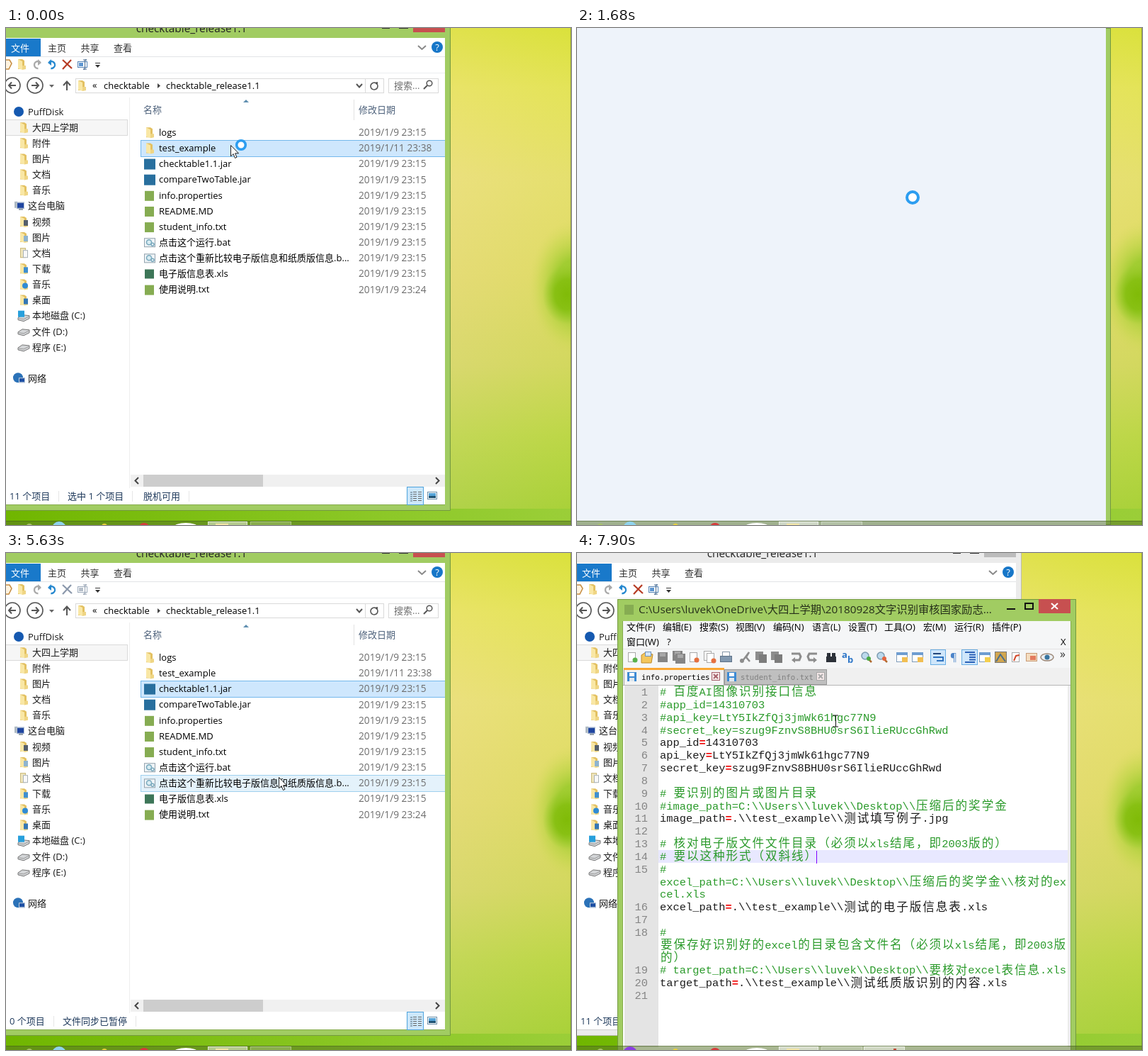
Animation of 798x701 px, one loop 8000 ms. Source, as an HTML page with a canvas:

```html
<!DOCTYPE html>
<html lang="zh-CN">
<head>
<meta charset="utf-8">
<title>Explorer session</title>
<style>
html, body { margin: 0; width: 100%; height: 100%; overflow: hidden; }
canvas { display: block; width: 798px; height: 701px; }
</style>
</head>
<body>
<canvas id="stage" width="798" height="701"></canvas>
<script>
const c = document.getElementById('stage').getContext('2d');
const LOOP = 8000;
const UI = '"Open Sans","Noto Sans CJK SC","Noto Sans CJK",sans-serif';
const MONO = '"Liberation Mono","Noto Sans CJK SC","Noto Sans CJK",monospace';
const ROW = 22.13;

// Value of the last key whose time has passed.
const at = (t, keys) => keys.reduce((v, k) => t >= k[0] ? k[1] : v, keys[0][1]);
const within = (t, a, b) => t >= a && t < b;

function box(x, y, w, h, fill, line) {
  if (fill) { c.fillStyle = fill; c.fillRect(x, y, w, h); }
  if (line) { c.strokeStyle = line; c.lineWidth = 1; c.strokeRect(x + .5, y + .5, w - 1, h - 1); }
}
function text(s, x, y, size = 13, color = '#000', align = 'left', family = UI, weight = 400) {
  c.font = `${weight} ${size}px ${family}`;
  c.fillStyle = color;
  c.textAlign = align;
  c.fillText(s, x, y + size * .36);
}
function path(pts, line, width = 1, fill, close) {
  c.beginPath();
  for (let i = 0; i < pts.length; i += 2) c.lineTo(pts[i], pts[i + 1]);
  if (close) c.closePath();
  if (fill) { c.fillStyle = fill; c.fill(); }
  if (line) { c.strokeStyle = line; c.lineWidth = width; c.stroke(); }
}
function disc(x, y, r, fill, line, width = 1, from = 0, to = 7) {
  c.beginPath();
  c.arc(x, y, r, from, to);
  if (fill) { c.fillStyle = fill; c.fill(); }
  if (line) { c.strokeStyle = line; c.lineWidth = width; c.stroke(); }
}
function oval(x, y, rx, ry, fill, line) {
  c.beginPath();
  c.ellipse(x, y, rx, ry, 0, 0, 7);
  c.fillStyle = fill;
  c.fill();
  if (line) { c.strokeStyle = line; c.lineWidth = 1.5; c.stroke(); }
}
function gradient(x0, y0, x1, y1, stops) {
  const g = c.createLinearGradient(x0, y0, x1, y1);
  stops.forEach(([p, col]) => g.addColorStop(p, col));
  return g;
}

const icons = {
  folder(x, y) {
    path([x - 5, y - 7, x + 1, y - 7, x + 4, y - 5, x + 4, y + 7, x - 5, y + 7], null, 0, '#e3c162', true);
    path([x - 5, y - 7, x + 1, y - 4, x + 1, y + 8, x - 5, y + 6], null, 0, '#f9e7a5', true);
    path([x + 1, y + 2, x + 6, y + 2, x + 6, y + 7, x + 1, y + 8], null, 0, '#efd584', true);
  },
  media(x, y, col) { icons.folder(x, y); box(x, y - 2, 6, 8, col); },
  video(x, y) { icons.media(x, y, '#555f6b'); },
  image(x, y) { icons.media(x, y, '#8fb4cf'); },
  paper(x, y) { box(x - 5, y - 7, 8, 14, '#efe5bd', '#c9b97a'); box(x - 1, y - 4, 7, 11, '#f8f8f8', '#a9b2b8'); },
  down(x, y) { icons.media(x, y, '#3f8fd0'); },
  music(x, y) { icons.folder(x, y); disc(x + 2, y + 2, 4, '#2f8bd4'); },
  desktop(x, y) { icons.media(x, y, '#3578b4'); },
  cloud(x, y) { disc(x, y, 7, '#1559b0'); },
  pc(x, y) { box(x - 6, y - 6, 4, 9, '#aeb9c2'); box(x - 3, y - 5, 11, 9, '#1f45a0', '#b9c6d4'); box(x, y + 4, 6, 2, '#8e9aa5'); },
  system(x, y) { icons.disk(x, y + 2); box(x - 8, y - 7, 9, 9, '#28a0dc'); },
  disk(x, y) {
    path([x - 8, y + 1, x - 2, y - 3, x + 8, y - 2, x + 8, y + 2, x, y + 6, x - 8, y + 4], '#777', 1, '#d4d6d8', true);
    path([x - 7, y + 2, x, y + 3, x + 8, y - 1], '#999');
  },
  net(x, y) { disc(x - 1, y - 1, 7, '#2b72b8'); box(x, y - 1, 9, 7, '#1d4fa4', '#c4d2dc'); },
  jar(x, y) { box(x - 8, y - 7, 16, 15, '#286f9e'); },
  note(x, y) { box(x - 7, y - 6, 13, 14, '#86ac52'); },
  xls(x, y) { box(x - 7, y - 6, 13, 13, '#3d7658'); },
  bat(x, y) {
    box(x - 8, y - 6, 16, 13, '#eef3f6', '#93a3ae');
    disc(x - 1, y, 3.5, '#d8ecf3', '#78a9bd', 1.5);
    disc(x + 4, y + 3, 2, null, '#78a9bd', 1.5);
  },
  photo(x, y) {
    box(x - 8, y - 5, 15, 12, '#fff', '#b8c4cc');
    box(x - 7, y - 4, 13, 10, gradient(0, y - 4, 0, y + 6, [[0, '#8cc7ee'], [.5, '#cfe7f4'], [.6, '#2c6280'], [1, '#3d86a8']]));
  }
};

const nav = [
  ['cloud', 'PuffDisk', 0], ['folder', '大四上学期'], ['folder', '附件'], ['folder', '图片'],
  ['folder', '文档'], ['folder', '音乐'], ['pc', '这台电脑', 0], ['video', '视频'], ['image', '图片'],
  ['paper', '文档'], ['down', '下载'], ['music', '音乐'], ['desktop', '桌面'],
  ['system', '本地磁盘 (C:)'], ['disk', '文件 (D:)'], ['disk', '程序 (E:)'], null, ['net', '网络', 0]
];
const DAY = '2019/1/9 23:15';
const release = [
  ['folder', 'logs'], ['folder', 'test_example', '2019/1/11 23:38'], ['jar', 'checktable1.1.jar'],
  ['jar', 'compareTwoTable.jar'], ['note', 'info.properties'], ['note', 'README.MD'],
  ['note', 'student_info.txt'], ['bat', '点击这个运行.bat'],
  ['bat', '点击这个重新比较电子版信息和纸质版信息.b...'], ['xls', '电子版信息表.xls'],
  ['note', '使用说明.txt', '2019/1/9 23:24']
];
const example = [
  ['xls', '表1.xls'], ['xls', '表1为基准的比较结果.xls'], ['xls', '表2.xls'],
  ['xls', '测试的电子版信息表.xls'], ['photo', '测试填写例子.jpg']
];

function glow(x, y, rx, ry, stops) {
  c.save();
  c.translate(x, y);
  c.scale(rx, ry);
  const g = c.createRadialGradient(0, 0, 0, 0, 0, 1);
  stops.forEach(([p, col]) => g.addColorStop(p, col));
  c.fillStyle = g;
  c.fillRect(-1, -1, 2, 2);
  c.restore();
}
function desktop() {
  box(0, 0, 798, 701, gradient(0, 0, 0, 701, [
    [0, '#dce23c'], [.12, '#e8e560'], [.3, '#eae07c'], [.5, '#e2da72'],
    [.68, '#d2d668'], [.82, '#b6d54a'], [1, '#98cc34']]));
  box(627, 0, 171, 701, gradient(627, 0, 798, 0, [[0, 'rgba(236,222,128,.25)'], [1, 'rgba(212,222,60,.22)']]));
  glow(800, 366, 62, 95, [[0, '#98c928'], [.4, 'rgba(155,203,44,.9)'], [.75, 'rgba(190,214,70,.45)'], [1, 'rgba(215,218,95,0)']]);
  glow(792, 376, 34, 42, [[0, '#80bb08'], [.5, 'rgba(132,190,14,.85)'], [1, 'rgba(150,200,40,0)']]);
  box(0, 678, 798, 23, gradient(0, 0, 798, 0, [[0, '#70b600'], [.75, '#90ca2c'], [1, '#9bce38']]));
}

function arrowButton(x, dir, on) {
  const col = on ? '#555' : '#c4c4c4';
  disc(x, 81, 11, '#fff', col, 1.6);
  path([x - 5 * dir, 81, x + 5 * dir, 81], col, 2);
  path([x + dir, 76.5, x + 5 * dir, 81, x + dir, 85.5], col, 2);
}

function ribbon(t, live) {
  const tools = within(t, 850, 3430);
  const inRelease = t < 100 || t >= 4300;
  box(0, 0, 628, 680, live ? '#a1cc62' : '#ebebeb');
  path([627.5, 0, 627.5, 680.5, 0, 680.5], live ? '#73993f' : '#bcbcb0');
  box(0, 14, 620, 659, '#fff', live ? '#86ac4d' : '#d0d0d0');
  box(-2, 14, 622, 658, '#fff');
  text(inRelease ? 'checktable_release1.1' : 'test_example', tools ? 99 : 262, .5, 15.36, '#222', 'center');
  box(575, 0, 45, 6, live ? '#c75050' : '#bcbcbc');
  box(531, 0, 11, 1, '#333');
  box(555, 0, 13, 1, '#333');
  box(0, 15, 49, 25, '#1979ca');
  text('文件', 7, 28, 13, '#fff');
  ['主页', '共享', '查看'].forEach((s, i) => text(s, 59 + 46.5 * i, 28.5, 13, '#333'));
  if (tools) {
    box(190, 0, 62, 15, '#f3f183');
    text('图片工具', 194, 2, 13, '#665f20');
    path([190.5, 15, 190.5, 39], '#e4e4e4');
    path([251.5, 15, 251.5, 39], '#e4e4e4');
    text('管理', 207, 28.5, 13, '#333');
  }
  path([582, 25, 587.5, 30, 593, 25], '#888', 2);
  disc(609, 27, 8, '#1676c8');
  text('?', 609, 27, 13, '#fff', 'center');
  path([0, 40.5, 620, 40.5], '#e2e4e6');
  path([0, 63.5, 620, 63.5], '#eceef0');
}

function quickBar(on) {
  path([0, 45, 5, 45, 8, 50, 4, 58, 0, 58], '#c58b3f', 1.5, '#fff3df');
  icons.folder(22, 51);
  const turn = (x, dir, col) => {
    disc(x - dir, 52, 5, null, col, 2.4, dir > 0 ? -2.2 : -4.8, dir > 0 ? 1.7 : -.9);
    path([x - 6 * dir, 49, x - dir, 44, x - dir, 53], null, 0, col, true);
  };
  turn(44, -1, '#aaa');
  turn(65, 1, '#2688cf');
  const cross = on ? '#b63b24' : '#8b98ab';
  path([80, 45, 93, 57], cross, 2.2);
  path([92, 45, 80, 58], cross, 2.2);
  box(101, 47, 14, 9, '#fff', on ? '#5281b4' : '#9caabb');
  box(103, 49, 6, 5, on ? '#5c95d1' : '#b5bec9');
  path([109, 45, 114, 45, 111.5, 45, 111.5, 58, 109, 58, 114, 58], on ? '#41658c' : '#8f9cad');
  box(126, 49, 7, 1, '#333');
  path([126, 52, 133, 52, 129.5, 56], null, 0, '#333', true);
}

function addressBar(t) {
  const inRelease = t < 100 || t >= 4300;
  arrowButton(9, -1, true);
  arrowButton(41, 1, !within(t, 100, 4190));
  path([61, 80, 68, 80, 64.5, 84], null, 0, '#666', true);
  path([86, 88, 86, 76], '#555', 2);
  path([81, 81, 86, 75.5, 91, 81], '#555', 2);
  box(98, 71, 436, 21, '#fff', '#d9d9d9');
  path([507.5, 71, 507.5, 92], '#d9d9d9');
  icons.folder(107, 81);
  text('«', 122, 80);
  text(inRelease ? 'checktable' : 'checktable_release1.1', 138, 81);
  const x = inRelease ? 214 : 281;
  path([x, 78, x + 4, 81.5, x, 85], null, 0, '#444', true);
  text(inRelease ? 'checktable_release1.1' : 'test_example', inRelease ? 226 : 293, 81);
  path([495, 79, 499, 83.5, 503, 79], '#555', 2);
  disc(520, 82, 5, null, '#555', 1.6, -.4, 5);
  path([520, 77, 525, 76, 525, 81], null, 0, '#555', true);
  box(540, 71, 71, 21, '#fff', '#d9d9d9');
  text('搜索...', 548, 81.5, 13, '#6d6d6d');
  disc(598, 78, 3.8, null, '#555', 1.5);
  path([595, 81, 590, 86], '#555', 2);
}

function navPane() {
  box(-1, 129, 173, 23, '#f6f6f6', '#dadada');
  nav.forEach((item, i) => {
    if (!item) return;
    const [icon, label, level = 1] = item, y = 118 + ROW * i;
    icons[icon](level ? 25 : 18, y);
    text(label, level ? 37 : 31, y, 13, '#1a1a1a');
  });
  path([174.5, 98, 174.5, 649], '#eeeeee');
}

function fileList(t) {
  text('名称', 194, 115, 13, '#4c607a');
  text('修改日期', 498, 115, 13, '#4c607a');
  path([335, 105, 339, 101, 343, 105], null, 0, '#5f8fb0', true);
  path([491.5, 101, 491.5, 130], '#e2e2e2');
  if (within(t, 100, 190) || within(t, 4300, 4750)) return;
  const files = t < 100 || t >= 4300 ? release : example;
  const chosen = at(t, [[0, 1], [100, -1], [750, 4], [4300, 1], [5630, 2], [5730, 4]]);
  const outline = within(t, 3280, 4300);
  const hover = within(t, 4750, 5730) ? 8 : -1;
  c.save();
  c.beginPath();
  c.rect(176, 130, 444, 500);
  c.clip();
  files.forEach(([icon, name, date = DAY], i) => {
    const y = 147.3 + ROW * i, top = Math.round(y - 11.5);
    if (i === chosen) box(190, top, 434, 24, outline ? null : '#cee7fd', '#74b8ec');
    else if (i === hover) box(190, top, 434, 24, '#e4f2fb', '#9fd0ee');
    icons[icon](203, y);
    text(name, 216, y);
    text(date, 498, y, 13.7, '#6d6d6d');
  });
  c.restore();
}

function statusBar(t) {
  const parts = at(t, [
    [0, [5, '11 个项目', 87, '选中 1 个项目', 194, '脱机可用']],
    [100, [5, '5 个项目', 80, '文件同步已暂停']],
    [850, [5, '5 个项目', 80, '选中 1 个项目', 170, '456 KB', 233, '脱机可用']],
    [3530, [5, '5 个项目', 80, '文件同步已暂停']],
    [4300, [5, '0 个项目', 80, '文件同步已暂停']],
    [5730, [5, '11 个项目', 87, '选中 1 个项目', 194, '脱机可用']]]);
  for (let i = 0; i < parts.length; i += 2) {
    text(parts[i + 1], parts[i], 660.5, 13, '#1e395b');
    const end = parts[i] + c.measureText(parts[i + 1]).width + 12;
    if (parts[i + 1] !== '选中 1 个项目' || parts.length < 8) path([Math.round(end) + .5, 653, Math.round(end) + .5, 668], '#e6e6e6');
  }
  box(176, 630, 444, 17, '#f0f0f0');
  box(194, 630, 169, 17, '#cdcdcd');
  path([187, 634, 182.5, 638.5, 187, 643], '#444', 2);
  path([607, 634, 611.5, 638.5, 607, 643], '#444', 2);
  box(566, 647, 24, 26, '#cde8fb', '#4fa3dc');
  for (let y = 654; y < 668; y += 3) {
    box(571, y, 3, 2, '#8fa9ba');
    box(575, y, 5, 1, '#666');
    box(582, y, 5, 1, '#666');
  }
  box(595, 654, 14, 11, '#fff', '#6d8fa8');
  box(597, 656, 10, 5, '#56a4d8');
  box(597, 660, 10, 3, '#1e5273');
}

function explorer(t) {
  ribbon(t, !(within(t, 1200, 2620) || t >= 6260));
  quickBar(t < 100 || within(t, 850, 3430) || t >= 5730);
  addressBar(t);
  navPane();
  fileList(t);
  statusBar(t);
}

function viewer() {
  box(0, 0, 754, 701, '#a1cc62', '#73993f');
  box(0, 0, 747, 701, '#eef3fa');
}

const menu = ['文件(F)', 70, '编辑(E)', 121, '搜索(S)', 173, '视图(V)', 224, '编码(N)', 277, '语言(L)', 332,
  '设置(T)', 383, '工具(O)', 434, '宏(M)', 489, '运行(R)', 533, '插件(P)', 586];

const code = String.raw`# 百度AI图像识别接口信息
#app_id=14310703
#api_key=LtY5IkZfQj3jmWk61hgc77N9
#secret_key=szug9FznvS8BHU0srS6IlieRUccGhRwd
app_id=14310703
api_key=LtY5IkZfQj3jmWk61hgc77N9
secret_key=szug9FznvS8BHU0srS6IlieRUccGhRwd

# 要识别的图片或图片目录
#image_path=C:\\Users\\luvek\\Desktop\\压缩后的奖学金
image_path=.\\test_example\\测试填写例子.jpg

# 核对电子版文件文件目录（必须以xls结尾，即2003版的）
# 要以这种形式（双斜线）
#|excel_path=C:\\Users\\luvek\\Desktop\\压缩后的奖学金\\核对的ex|cel.xls
excel_path=.\\test_example\\测试的电子版信息表.xls

#|要保存好识别好的excel的目录包含文件名（必须以xls结尾，即2003版|的）
# target_path=C:\\Users\\luvek\\Desktop\\要核对excel表信息.xls
target_path=.\\test_example\\测试纸质版识别的内容.xls
`.split('\n');

const CELL = 9.26;
function codeRow(line, y, comment) {
  let x = 117;
  for (const ch of line) {
    const wide = ch > '\u2000';
    const color = comment ? '#2a9a2a' : ch === '=' ? '#f00000' : '#1c1c1c';
    if (wide) text(ch, x + .9, y, 16.6, color, 'left', MONO, 300);
    else text(ch, x, y, 15.43, color, 'left', MONO, ch === '=' && !comment ? 700 : 400);
    x += wide ? CELL * 2 : CELL;
  }
}

function editor(t) {
  box(67, 187, 48, 510, '#e4e4e4');
  box(693, 187, 4, 510, '#ececec');
  if (t < 7380) return;
  box(115, 419, 578, 18, '#e8e8ff');
  let y = 195.5;
  code.forEach((line, i) => {
    text(i + 1, 100, y, 15.43, '#858585', 'right', MONO);
    line.split('|').forEach(part => {
      codeRow(part, y, line[0] === '#');
      y += 17.83;
    });
  });
  if (!within(t, 7590, 7900)) box(338, 420, 1, 18, '#8000ff');
}

function floppy(x, y, col) {
  box(x - 6, y - 6, 13, 13, col);
  box(x - 3, y - 5, 7, 5, '#fff');
  box(x - 3, y + 2, 7, 5, '#dfe7ee');
}
function graySave(x, y) {
  box(x - 7, y - 7, 14, 14, '#858585');
  box(x - 4, y - 6, 8, 5, '#a8a8a8');
}
function page(x, y, badge) {
  box(x - 6, y - 7, 11, 14, '#fff', '#a9a9a9');
  if (badge) disc(x + 4, y + 4, 3.5, badge);
}
function lens(x, y, col) {
  path([x + 2, y + 2, x + 7, y + 7], '#b06a30', 2.5);
  disc(x - 2, y - 2, 5, '#bcd9ec', '#7c9bb0', 1.5);
  disc(x + 3, y + 2, 3, col);
}
function panel(x, y, col) {
  box(x - 8, y - 7, 16, 14, '#fff', '#7f9cba');
  box(x - 8, y - 7, 16, 4, '#6f9dd0');
  box(x, y, 8, 7, col);
}

function toolbar() {
  const y = 147, gray = '#8d8d8d';
  box(65, 136, 632, 26, '#f5f6f7');
  page(78, y, '#59b14b');
  path([91, 144, 97, 140, 107, 143, 105, 155, 91, 155], '#bd8a2b', 1, '#f4c65c', true);
  box(96, 139, 9, 7, '#d4e5f6', '#6e93bd');
  graySave(121, y);
  graySave(142, y - 2);
  graySave(146, y + 2);
  page(165, y, '#e57040');
  page(185, y - 2);
  page(189, y + 1, '#e57040');
  box(205, 139, 11, 7, '#fff', '#8899aa');
  box(202, 145, 17, 9, '#8299b0', '#5d7187');
  path([234, 152, 243, 140, 239, 147, 244, 153], gray, 2.5);
  disc(233, 152, 3, gray);
  [260, 282].forEach(x => {
    box(x - 8, y - 8, 11, 12, gray);
    box(x - 3, y - 4, 11, 12, '#7c7c7c');
  });
  [[310, 1], [332, -1]].forEach(([x, d]) => {
    path([x - 7 * d, 142, x + 4 * d, 142, x + 6 * d, 146, x + 4 * d, 151, x - 3 * d, 151], gray, 3);
    path([x - 2 * d, 147, x - 7 * d, 151, x - 2 * d, 155], null, 0, gray, true);
  });
  [356, 363].forEach(x => {
    box(x - 3, 141, 5, 5, '#2c3139');
    box(x - 4, 146, 7, 8, '#2c3139');
  });
  text('a', 374, 143, 13, '#2d76c8', 'left', UI, 700);
  text('b', 382, 150, 13, '#2d76c8', 'left', UI, 700);
  lens(409, y, '#49ab42');
  lens(431, y, '#e3653f');
  panel(459, y, '#f1be52');
  panel(481, y, '#f1be52');
  [[499, 22], [543, 23]].forEach(([x, w]) => box(x, 136, w, 22, '#cfe6fa', '#69aee5'));
  path([503, 142, 514, 142], '#24477a', 2);
  path([503, 147, 517, 147, 517, 152, 508, 152], '#2f73c0', 2);
  text('¶', 532, 147, 15, '#4b84c9', 'center');
  for (let i = 0; i < 5; i++) box(i % 4 ? 554 : 548, 139 + i * 3.5, i % 4 ? 9 : 14, 2, '#2b62b8');
  panel(576, y, '#f4cf4d');
  box(590, 139, 17, 16, '#d2a64f', '#777');
  path([592, 153, 598, 143, 605, 153], '#4c6f8b', 2);
  page(620, y);
  path([617, 152, 620, 145, 625, 144], '#d34b2d', 2);
  box(634, 141, 16, 12, '#f4ddc0', '#c99b76');
  box(640, 145, 8, 6, '#e37b5e');
  oval(664, y, 9, 5, '#e9eef2', '#9b8675');
  disc(664, y, 3.5, '#38759f');
  text('»', 682, 142, 16, '#333');
}

function tabs() {
  box(65, 162, 632, 25, '#f0f0f0');
  box(66, 162, 142, 25, '#f3f3f3', '#a8a8a8');
  box(66, 162, 142, 3, '#faa632');
  box(208, 164, 145, 22, '#bfbfbf', '#999');
  [[77, 'info.properties', 91, '#000', 196, '#a6616b'], [218, 'student_info.txt', 231, '#808080', 344, '#a8a8a8']]
    .forEach(([ix, name, x, col, cx, close]) => {
      floppy(ix, 174, '#3d8ad3');
      text(name, x, 175, 10.7, col, 'left', '"DejaVu Sans Mono",monospace');
      box(cx - 6, 168, 12, 12, '#f5e9e9', close);
      path([cx - 3, 171, cx + 3, 177], close, 2);
      path([cx + 3, 171, cx - 3, 177], close, 2);
    });
  path([65, 186.5, 697, 186.5], '#b6b6b6');
}

function notepad(t) {
  box(57, 65, 648, 640, '#a1cc62', '#73993f');
  box(64, 96, 634, 606, '#fff', '#86ac4d');
  icons.note(74, 79);
  text('C:\\Users\\luvek\\OneDrive\\大四上学期\\20180928文字识别审核国家励志...', 87, 79, 15.3, '#26301a');
  box(607, 78, 12, 2, '#111');
  c.strokeStyle = '#111';
  c.lineWidth = 2;
  c.strokeRect(633, 71, 11, 8);
  box(652, 65, 45, 20, '#c75050');
  path([670, 71, 679, 79], '#fff', 2);
  path([679, 71, 670, 79], '#fff', 2);
  if (t >= 6640) {
    box(65, 96, 632, 40, '#f5f6f7');
    for (let i = 0; i < menu.length; i += 2) text(menu[i], menu[i + 1], 104.5);
    text('窗口(W)', 70, 125.5);
    text('?', 127, 125.5);
    text('X', 683, 125.5);
    path([65, 135.5, 697, 135.5], '#e4e4e4');
  }
  if (t >= 6950) toolbar();
  if (t >= 7060) tabs();
  if (t >= 7170) editor(t);
}

function taskbar(t) {
  const opened = t >= 6260;
  box(0, 695, 798, 6, 'rgba(84,112,38,.5)');
  box(0, 695, 798, 1, 'rgba(60,85,25,.45)');
  disc(33, 704, 5, '#a8c36a');
  disc(75, 706, 10, opened ? '#8a3fe0' : '#8fd3ee');
  disc(139, 703, 4, '#ecd23c');
  disc(195, 706, 8, '#d63b3b');
  oval(254, 704, 17, 6, '#fff');
  box(285, 696, 56, 6, 'rgba(255,255,255,.5)', 'rgba(255,255,255,.6)');
  box(296, 699, 18, 2, '#f4e6a8');
  box(345, 696, 58, 6, 'rgba(255,255,255,.2)', 'rgba(255,255,255,.3)');
  if (opened) {
    box(405, 696, 58, 6, 'rgba(255,255,255,.45)', 'rgba(255,255,255,.6)');
    box(447, 699, 4, 2, '#c04a3a');
  }
  path([797.5, 0, 797.5, 701], 'rgba(90,120,40,.5)');
}

function ring(x, y, r, width) {
  disc(x, y, r, '#fff', '#2c9df0', width);
}
function arrow(x, y) {
  path([x + .5, y + .5, x + .5, y + 16, x + 4, y + 12.5, x + 6.5, y + 18.5, x + 9, y + 17.3,
    x + 6.6, y + 11.8, x + 11.5, y + 11.8], '#222', 1, '#fff', true);
}
function pointer(t) {
  const [kind, x, y] = at(t, [
    [0, ['busy', 317, 165]], [560, ['arrow', 310, 195]], [660, ['arrow', 294, 230]],
    [1200, ['ring', 298, 236]], [1600, ['ring', 474, 239]], [2050, ['busy', 462, 236]],
    [2200, ['busy', 462, 237]], [2400, ['arrow', 462, 237]],
    [2620, ['arrow', 386, 315]], [2730, ['arrow', 385, 316]], [4300, ['busy', 385, 316]],
    [4550, ['arrow', 385, 316]], [5730, ['arrow', 362, 232]], [6150, ['ring', 362, 236]],
    [7380, ['beam', 365, 237]]]);
  if (kind === 'ring') ring(x, y, 8, 4);
  if (kind === 'busy') ring(x + 15, y, 6.3, 3.6);
  if (kind === 'arrow' || kind === 'busy') arrow(x, y);
  if (kind === 'beam') {
    path([x - 4, y - 8, x + 4, y - 8], '#111');
    path([x + .5, y - 8, x + .5, y + 8], '#111');
    path([x - 4, y + 8, x + 4, y + 8], '#111');
  }
}

function fade(alpha, draw) {
  if (!alpha) return;
  c.save();
  c.globalAlpha = alpha;
  draw();
  c.restore();
}

function render(t) {
  desktop();
  explorer(t);
  fade(at(t, [[0, 0], [1300, .35], [1400, .75], [1500, 1], [2620, 0]]), viewer);
  fade(at(t, [[0, 0], [6260, .4], [6380, .8], [6500, 1]]), () => notepad(t));
  taskbar(t);
  pointer(t);
}

const start = performance.now();
function tick() {
  render((performance.now() - start) % LOOP);
  requestAnimationFrame(tick);
}
tick();
</script>
</body>
</html>
```
